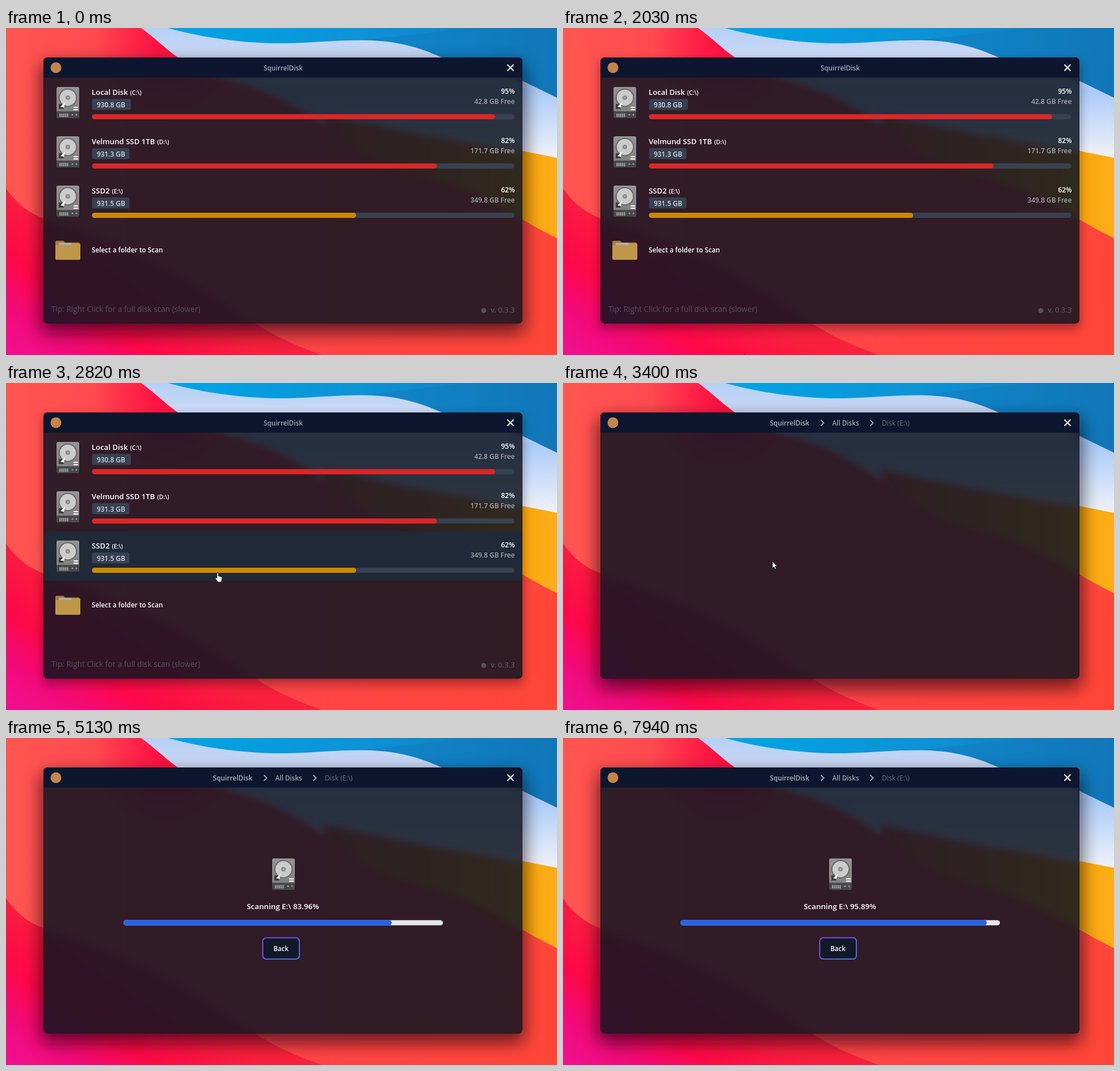
Write an HTML page that moves like this. It is 971 by 577 pixels and loops after 8000 ms.

```html
<!DOCTYPE html>
<html lang="en">
<head>
<meta charset="utf-8">
<title>Disk scan</title>
<style>
  html, body { margin: 0; width: 100%; height: 100%; overflow: hidden; background: #301a26; }
  svg { display: block; width: 100%; height: 100%; }
  text { font-family: "Open Sans", "Noto Sans", sans-serif; font-weight: 600; white-space: pre; }
</style>
</head>
<body>
<svg viewBox="0 0 971 577" preserveAspectRatio="none">
  <defs>
    <linearGradient id="blue" gradientUnits="userSpaceOnUse" x1="270" y1="0" x2="971" y2="60">
      <stop offset="0" stop-color="#00a6e6"/><stop offset=".5" stop-color="#0d93d6"/><stop offset="1" stop-color="#1075b6"/>
    </linearGradient>
    <linearGradient id="pale" gradientUnits="userSpaceOnUse" x1="0" y1="0" x2="0" y2="230">
      <stop offset="0" stop-color="#b4d0f5"/><stop offset=".25" stop-color="#cfdaf5"/>
      <stop offset=".48" stop-color="#abcbf8"/><stop offset="1" stop-color="#f2f2f8"/>
    </linearGradient>
    <linearGradient id="gold" gradientUnits="userSpaceOnUse" x1="580" y1="0" x2="971" y2="0">
      <stop offset="0" stop-color="#e85a3c"/><stop offset=".45" stop-color="#ea7e2a"/>
      <stop offset=".84" stop-color="#fba60c"/><stop offset="1" stop-color="#fcae1a"/>
    </linearGradient>
    <linearGradient id="red" gradientUnits="userSpaceOnUse" x1="0" y1="0" x2="971" y2="0">
      <stop offset="0" stop-color="#ff5650"/><stop offset=".25" stop-color="#ff4350"/><stop offset="1" stop-color="#ff4638"/>
    </linearGradient>
    <radialGradient id="flare" gradientUnits="userSpaceOnUse" cx="285" cy="25" r="130">
      <stop offset="0" stop-color="#ff0a40"/><stop offset="1" stop-color="#ff0a40" stop-opacity="0"/>
    </radialGradient>
    <linearGradient id="pink" gradientUnits="userSpaceOnUse" x1="0" y1="577" x2="160" y2="340">
      <stop offset="0" stop-color="#f01090"/><stop offset=".27" stop-color="#f20a78"/>
      <stop offset=".51" stop-color="#ff0848"/><stop offset=".9" stop-color="#f8203c"/>
    </linearGradient>
    <linearGradient id="edge" x1="0" y1="0" x2="1" y2="1">
      <stop offset="0" stop-color="#8b3fe0"/><stop offset="1" stop-color="#4078e8"/>
    </linearGradient>
    <linearGradient id="metal" x1="0" y1="0" x2="0" y2="1">
      <stop offset="0" stop-color="#949494"/><stop offset="1" stop-color="#7c7c7c"/>
    </linearGradient>
    <filter id="frost" filterUnits="userSpaceOnUse" x="0" y="0" width="971" height="577"><feGaussianBlur stdDeviation="6"/></filter>
    <filter id="wide" filterUnits="userSpaceOnUse" x="0" y="0" width="971" height="640"><feGaussianBlur stdDeviation="15"/></filter>
    <filter id="tight" filterUnits="userSpaceOnUse" x="0" y="0" width="971" height="640"><feGaussianBlur stdDeviation="9"/></filter>
    <clipPath id="frame"><rect x="66" y="52" width="844" height="469.5" rx="7"/></clipPath>

    <g id="wall">
      <rect width="971" height="577" fill="url(#blue)"/>
      <path d="M590 22C680 20 740 5 835 0H971V130H765Z" fill="#1278bb" opacity=".45"/>
      <path d="M238 0H285C335 14 400 25 470 27C540 28 600 18 660 23C710 27 745 42 768 52C820 65 870 74 897 87L971 123V577H238Z" fill="url(#pale)"/>
      <path d="M560 150C680 178 800 197 910 217L971 229V577H560Z" fill="url(#gold)"/>
      <g id="hills">
        <path id="ridge" d="M0 0H238C262 17 282 38 303 52C330 68 360 79 385 87C480 112 530 145 580 185C640 245 720 255 800 280C860 300 890 331 971 371V577H0Z" fill="url(#red)"/>
        <use href="#flareShape"/>
      </g>
      <path d="M0 0H238C262 17 282 38 303 52C330 68 360 79 385 87V160H0Z" fill="url(#flare)"/>
      <path d="M0 283C20 312 40 325 66 336C200 375 310 430 410 500C460 540 510 560 556 577H0Z" fill="url(#pink)"/>
    </g>

    <g id="drive">
      <rect width="40" height="55" rx="3" fill="url(#metal)"/>
      <path d="M0 43H40V52a3 3 0 0 1-3 3H3a3 3 0 0 1-3-3Z" fill="#48484a"/>
      <circle cx="20" cy="19" r="16.3" fill="#6a6a6a"/>
      <circle cx="20" cy="19" r="14.2" fill="#cbcbcb"/>
      <circle cx="20" cy="19" r="4" fill="#8a8a8a"/><circle cx="20" cy="19" r="1.2" fill="#bbb"/>
      <path d="M4 30H9L13 39H4Z" fill="#3c3c3e"/>
      <path d="M15 27L13 36 7 35Z" fill="#fff"/>
      <path d="M30 36H38M30 40H38" stroke="#fff" stroke-width="2"/>
      <path d="M5 50H21" stroke="#999" stroke-width="6" stroke-dasharray="2.4 .9"/>
      <circle cx="28" cy="49" r="1.6" fill="#999"/><circle cx="35" cy="49" r="1.6" fill="#999"/>
    </g>
  </defs>

  <use href="#wall"/>
  <rect id="activeShadow" x="62" y="62" width="852" height="476" rx="10" fill="#100008" opacity=".62" filter="url(#wide)"/>
  <rect id="idleShadow" x="65" y="59" width="846" height="472" rx="8" fill="#100008" opacity=".36" filter="url(#tight)"/>
  <g clip-path="url(#frame)">
    <use href="#wall" filter="url(#frost)"/>
    <rect x="66" y="52" width="844" height="470" fill="#0e1520" opacity=".85"/>
    <rect x="66" y="52" width="844" height="35.5" fill="#0d162e"/>
  </g>
  <rect x="66.5" y="52.5" width="843" height="468.5" rx="6.5" fill="none" stroke="#160f1c" stroke-opacity=".75"/>
  <circle cx="88" cy="70" r="9.5" fill="#c4854a"/>
  <path d="M883.5 64.5l11 11m0-11l-11 11" stroke="#fff" stroke-width="2"/>

  <g id="list">
    <rect id="hover" x="67" width="842" height="87" fill="#1f2937"/>
    <g id="rows"></g>
    <path d="M87 377.5a2 2 0 0 1 2-2H101l3 3H128a2 2 0 0 1 2 2V407H87Z" fill="#a87f36"/>
    <path d="M93 379H115L118 384H93Z" fill="#a9abb8"/>
    <path d="M87 383H114L117 380H129a2 2 0 0 1 2 2V407a2 2 0 0 1-2 2H89a2 2 0 0 1-2-2Z" fill="#bf9749"/>
    <circle cx="842" cy="498.5" r="4.5" fill="#5b4f5b"/>
  </g>

  <g id="crumbs">
    <path d="M454.5 65.500l5 5-5 5M541.500 65.500l5 5-5 5" fill="none" stroke="#9ca3af" stroke-width="2"/>
  </g>

  <g id="scan">
    <use href="#drive" x="469" y="212.5"/>
    <rect x="207" y="321.5" width="563" height="9" rx="4.5" fill="#e5e7eb"/>
    <rect id="fill" x="207" y="321.5" height="9" rx="4.5" fill="#2563eb"/>
    <rect x="452.5" y="352.5" width="64.5" height="37.5" rx="6" fill="#111827" stroke="url(#edge)" stroke-width="2"/>
  </g>

  <g id="cursor" fill="#fff" stroke="#111" stroke-width=".9" stroke-linejoin="round">
    <path id="arrow" d="M0 0V12.500L2.900 9.800 4.700 14 6.700 13.200 4.900 9.100H8.800Z"/>
    <path id="hand" transform="scale(1.08)" d="M-1.200 9V1.500a1.200 1.200 0 0 1 2.400 0V5.500l4.500 1.200q1.700.5 1.600 2.300l-.5 3.500-1.100 3H.3L-3.700 10q-.2-1.800 1.300-1.500Z"/>
  </g>
</svg>

<script>
const LOOP = 8000, ROW_TOP = 87.5, ROW_PITCH = 87, BAR_WIDTH = 563;
const FOCUS_LOST = 250, FOCUS_BACK = 3320, LIST_CLOSED = 3400, SCAN_SHOWN = 3670;
const $ = id => document.getElementById(id);

function add(parent, tag, attrs, content = "") {
  const node = document.createElementNS("http://www.w3.org/2000/svg", tag);
  for (const key in attrs) node.setAttribute(key, attrs[key]);
  node.textContent = content;
  return parent.appendChild(node);
}

function label(parent, content, x, y, size, fill = "#fff", extra = {}) {
  return add(parent, "text", { x, y, "font-size": size, fill, ...extra }, content);
}

const END = { "text-anchor": "end" }, MIDDLE = { "text-anchor": "middle" };

const drives = [
  { name: "Local Disk", letter: "C", size: "930.8", free: "42.8", used: 95, end: 862, color: "#dc2626" },
  { name: "Velmund SSD 1TB", letter: "D", size: "931.3", free: "171.7", used: 82, end: 759, color: "#dc2626" },
  { name: "SSD2", letter: "E", size: "931.5", free: "349.8", used: 62, end: 617, color: "#ca8a04" }
];

drives.forEach((drive, i) => {
  const row = add($("rows"), "g", { transform: `translate(0 ${i * ROW_PITCH})` });
  add(row, "use", { href: "#drive", x: 89, y: 104 });
  const title = label(row, drive.name, 151, 118, 13.2);
  add(title, "tspan", { dx: 4, "font-size": 10.3 }, `(${drive.letter}:\\)`);
  add(row, "rect", { x: 151.5, y: 125, width: i ? 66 : 68.5, height: 19.5, rx: 3, fill: "#374151" });
  label(row, `${drive.size} GB`, 160, 140, 11.9, "#d5d9e0");
  label(row, `${drive.used}%`, 896.5, 116, 12, "#fff", END);
  label(row, `${drive.free} GB Free`, 896.5, 134, 11.9, "#a3a3ab", END);
  const bar = { x: 151.5, y: 152, height: 9, rx: 4.5 };
  add(row, "rect", { ...bar, width: 744.5, fill: "#374151" });
  add(row, "rect", { ...bar, width: drive.end - 151.5, fill: drive.color });
});

const list = $("list"), crumbs = $("crumbs"), scan = $("scan");
label(list, "SquirrelDisk", 488.5, 75, 11.8, "#9ca8b8", MIDDLE);
label(list, "Select a folder to Scan", 151, 395.5, 11.8);
label(list, "Tip: Right Click for a full disk scan (slower)", 80, 501, 13.6, "#5b4f5b", { style: "font-weight:400" });
label(list, "v. 0.3.3", 896.5, 502, 13.1, "#6a606a", { ...END, style: "font-weight:400" });
label(crumbs, "SquirrelDisk", 364.5, 75, 11.9, "#a8b0bc");
label(crumbs, "All Disks", 474.5, 75, 11.7, "#9ca3af");
label(crumbs, "Disk (E:\\)", 562, 75, 12.1, "#6b7280", { style: "font-weight:500" });
label(scan, "Back", 484.5, 376, 11.6, "#fff", MIDDLE);
const status = label(scan, "", 488, 302, 13.4, "#fff", MIDDLE);

// Each key: time, then values
const cursorKeys = [
  [2030, 320, 576], [2200, 342, 556], [2820, 373, 334.5], [2900, 373, 334.5],
  [3120, 369, 314.5], [3470, 369, 314.5], [3860, 359, 322], [4130, 359, 322], [4700, 379, 556]
];
const progressKeys = [
  [3630, 0], [3730, 40], [3830, 62], [4030, 70.5], [4130, 73.32], [4730, 83.4], [5130, 83.96],
  [5630, 84.4], [6430, 91.1], [6730, 92.26], [7330, 92.9], [7930, 95.89]
];

function sample(keys, t, ease = u => u) {
  const next = keys.findIndex(key => key[0] > t);
  if (next < 0) return keys[keys.length - 1].slice(1);
  if (next === 0) return keys[0].slice(1);
  const a = keys[next - 1], b = keys[next];
  const u = ease((t - a[0]) / (b[0] - a[0]));
  return a.slice(1).map((value, i) => value + (b[i + 1] - value) * u);
}

const smooth = u => u * u * (3 - 2 * u);
const show = (id, visible) => $(id).setAttribute("display", visible ? "inline" : "none");

function render(t) {
  const active = t < FOCUS_LOST || t >= FOCUS_BACK;
  const listOpen = t < LIST_CLOSED;
  show("activeShadow", active);
  show("idleShadow", !active);
  show("list", listOpen);
  show("crumbs", !listOpen);
  show("scan", t >= SCAN_SHOWN);

  const pointerVisible = t >= 2030 && t < 4740;
  const [x, y] = sample(cursorKeys, t, smooth);
  const hoveredRow = Math.floor((y - ROW_TOP) / ROW_PITCH);
  const hovering = listOpen && pointerVisible && hoveredRow >= 0 && hoveredRow < 4;
  show("cursor", pointerVisible);
  show("hand", hovering);
  show("arrow", !hovering);
  show("hover", hovering);
  $("hover").setAttribute("y", Math.round(ROW_TOP + hoveredRow * ROW_PITCH));
  $("cursor").setAttribute("transform", `translate(${x} ${y})`);

  // The scan reports ten times a second
  const tick = Math.floor((t - 30) / 100) * 100 + 30;
  const [percent] = sample(progressKeys, tick);
  status.textContent = `Scanning E:\\ ${percent.toFixed(2)}%`;
  $("fill").setAttribute("width", BAR_WIDTH * percent / 100);
}

const start = performance.now();
function loop() {
  render((performance.now() - start) % LOOP);
  requestAnimationFrame(loop);
}
loop();
</script>
</body>
</html>
```
